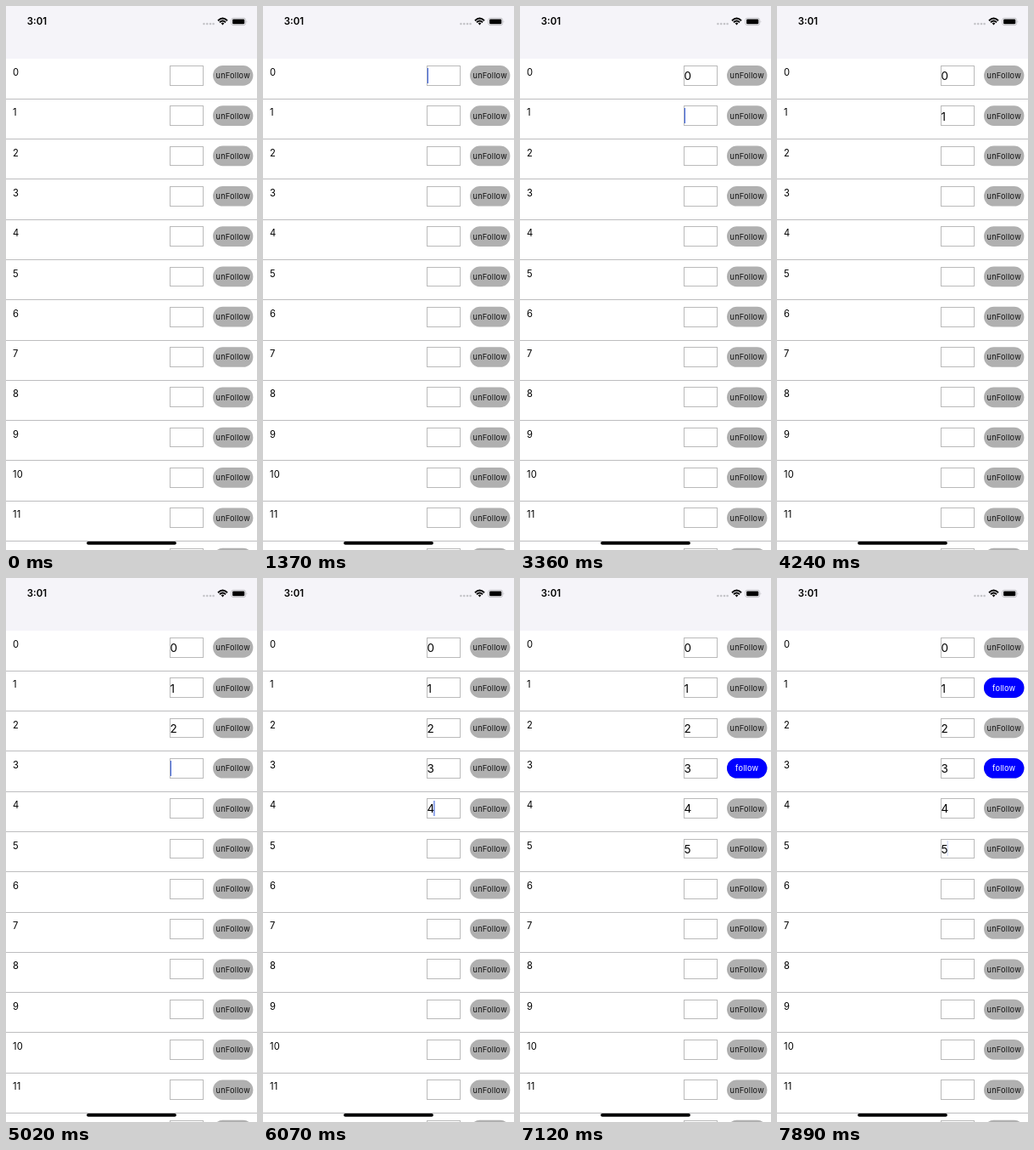
Animation of 296x640 px, one loop 8 s. Source, as an HTML page:

```html
<!DOCTYPE html>
<html lang="en">
<head>
<meta charset="utf-8">
<title>Follow list</title>
<style>
html, body { margin: 0; width: 100%; height: 100%; overflow: hidden; background: #fff; }
svg { display: block; width: 296px; height: 640px; font-family: Inter, Roboto, sans-serif; }
.clock { font-size: 11.5px; font-weight: 600; }
.label { font-size: 11.2px; letter-spacing: .2px; }
.value { font-size: 13.5px; }
.btn { font-size: 9.2px; letter-spacing: .2px; text-anchor: middle; }
.line { fill: #bdbdbf; }
.field { fill: #fff; stroke: #bababa; }

.value, .follow { visibility: hidden; animation: 8s step-end infinite; }
#value0 { animation-name: value0; }
#value1 { animation-name: value1; }
#value2 { animation-name: value2; }
#value3 { animation-name: value3; }
#value4 { animation-name: value4; }
#value5 { animation-name: value5; }
#follow1 { animation-name: follow1; }
#follow3 { animation-name: follow3; }
@keyframes value0 { 32.125%, 100% { visibility: visible; } }
@keyframes value1 { 49.5%, 100% { visibility: visible; } }
@keyframes value2 { 57.75%, 100% { visibility: visible; } }
@keyframes value3 { 68.5%, 100% { visibility: visible; } }
@keyframes value4 { 75.875%, 100% { visibility: visible; } }
@keyframes value5 { 86%, 100% { visibility: visible; } }
@keyframes follow1 { 92.625%, 100% { visibility: visible; } }
@keyframes follow3 { 89%, 100% { visibility: visible; } }

#caret { fill: #4468dc; animation: caret 8s step-end infinite; }
@keyframes caret {
  0% { transform: translate(0, 0); opacity: 0; }
  17.125% { transform: translate(0, 0); opacity: 1; }
  25.125% { transform: translate(0, 0); opacity: 0; }
  32.125% { transform: translate(7.5px, 0); opacity: 1; }
  33.625% { transform: translate(7.5px, 0); opacity: .25; }
  40.5% { transform: translate(0, 47px); opacity: .5; }
  42% { transform: translate(0, 47px); opacity: 1; }
  49.5% { transform: translate(4.8px, 47px); opacity: 1; }
  51% { transform: translate(4.8px, 47px); opacity: .3; }
  53% { transform: translate(4.8px, 47px); opacity: 0; }
  57.75% { transform: translate(6.8px, 95px); opacity: 1; }
  62.75% { transform: translate(0, 142px); opacity: 1; }
  68.5% { transform: translate(7.5px, 142px); opacity: 1; }
  75.875% { transform: translate(7.5px, 189px); opacity: 1; }
  84.5% { transform: translate(0, 236px); opacity: 1; }
  86% { transform: translate(6.8px, 236px); opacity: 1; }
  89% { transform: translate(6.8px, 236px); opacity: 0; }
  90.375% { transform: translate(6.8px, 236px); opacity: 1; }
  92.625% { transform: translate(6.8px, 236px); opacity: 0; }
  98.625%, 100% { transform: translate(6.8px, 236px); opacity: .25; }
}
</style>
</head>
<body>
<svg viewBox="0 0 296 640">
  <rect width="296" height="640" fill="#fff"/>
  <rect width="296" height="62" fill="#f5f4f9"/>
  <text class="clock" x="24.8" y="22.3">3:01</text>
  <g fill="#c4c4c8">
    <circle cx="233.4" cy="21" r="1.3"/>
    <circle cx="237.2" cy="21" r="1.3"/>
    <circle cx="241" cy="21" r="1.3"/>
    <circle cx="244.6" cy="21" r="1.3"/>
  </g>
  <g fill="none" stroke="#000" stroke-width="1.9">
    <path d="M250 17.2Q255.5 11.9 261 17.2"/>
    <path d="M252 19.3Q255.5 15.9 259 19.3"/>
  </g>
  <path d="M253.6 20.3Q255.5 18.7 257.4 20.3L255.5 22.4Z"/>
  <rect x="265.8" y="14.2" width="16.8" height="8.4" rx="2.3" fill="none" stroke="#b8b8bc" stroke-width=".8"/>
  <rect x="267.1" y="15.5" width="14.2" height="5.8" rx="1.2"/>
  <path d="M283.6 17Q285.2 18.4 283.6 19.8Z" fill="#b8b8bc"/>
  <g id="rows"></g>
  <rect id="caret" x="193.8" y="73" width="1.2" height="18"/>
  <rect x="95.1" y="629.9" width="105.8" height="3.9" rx="1.95"/>
</svg>
<script>
const PITCH = 47.31, HEIGHT = 23.68;

const button = (y, text, fill, color) =>
  `<rect x="244" y="${y + 70}" width="47.4" height="${HEIGHT}" rx="${HEIGHT / 2}" fill="${fill}"/>
   <text class="btn" x="267.7" y="${y + 85.3}" fill="${color}">${text}</text>`;

// Thin outlines snap to whole pixels; text and pills keep fractional positions.
const field = y => {
  const top = Math.round(y + 70), bottom = Math.round(y + 70 + HEIGHT);
  return `<rect class="field" x="193.5" y="${top + .5}" width="39" height="${bottom - top - 1}"/>`;
};

const row = (_, i) => {
  const y = PITCH * i;
  return `<text class="label" x="8" y="${y + 82}">${i}</text>
    ${field(y)}
    ${i < 6 ? `<text class="value" id="value${i}" x="193.5" y="${y + 87.2}">${i}</text>` : ''}
    ${button(y, 'unFollow', '#b0b0b0', '#111')}
    ${i === 1 || i === 3 ? `<g class="follow" id="follow${i}">${button(y, 'follow', '#00f', '#fff')}</g>` : ''}
    <rect class="line" y="${Math.floor(y + 109.15)}" width="296" height="1"/>`;
};

document.getElementById('rows').innerHTML = Array.from({ length: 13 }, row).join('');
</script>
</body>
</html>
```
